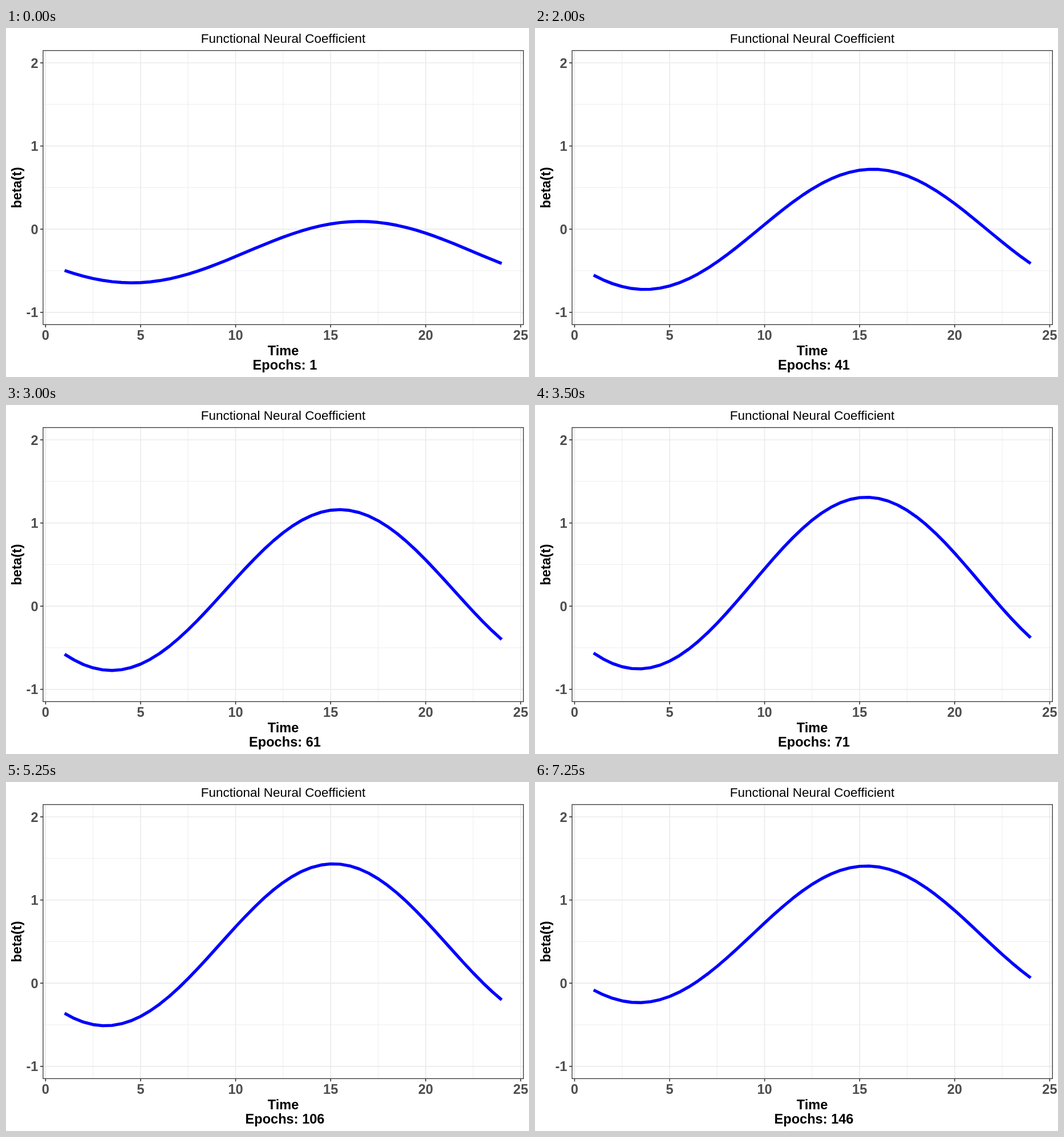
Write an HTML page that moves like this. It is 917 px wide and 611 px high and loops after 7.5 s.

```html
<!DOCTYPE html>
<html lang="en">
<head>
<meta charset="utf-8">
<title>Functional Neural Coefficient</title>
<style>
  html, body { margin: 0; width: 100%; height: 100%; overflow: hidden; background: #fff; }
  svg { display: block; width: 100%; height: 100%; }
  text { font: bold 23.6px "Liberation Sans", Arial, sans-serif; text-anchor: middle; }
  .title { font-weight: normal; font-size: 22.5px; }
  .tick { fill: #4d4d4d; }
  .end { text-anchor: end; }
  path, rect { fill: none; }
  .minor { stroke: #ebebeb; stroke-width: 0.9; }
  .major { stroke: #ebebeb; stroke-width: 1.7; }
  .axis { stroke: #333; stroke-width: 1.6; }
  .frame { stroke: #333; stroke-width: 1.3; }
  .curve { stroke: #00f; stroke-width: 5.4; stroke-linejoin: round; }
</style>
</head>
<body>
<svg id="chart" viewBox="0 0 917 611"></svg>
<script>
const LOOP = 7500, STEP = 250, EPOCHS_PER_STEP = 5, PERIOD = 24;
const LEFT = 65, RIGHT = 907.3, TOP = 39.5, BOTTOM = 519.3;
const MID_X = 486, MID_Y = 279.5;
const px = x => 69.4 + 33.32 * x;
const py = y => 352.2 - 145.6 * y;

// Fitted wave at chosen steps: [step, mean, amplitude, time of the peak]
const KEYS = [
  [0, -0.276, 0.369, 16.55],
  [4, -0.164, 0.511, 16.05],
  [8, -0.002, 0.723, 15.69],
  [12, 0.194, 0.967, 15.47],
  [17, 0.3805, 1.0605, 15.22],
  [21, 0.4615, 0.9735, 15.145],
  [29, 0.5875, 0.8215, 15.364]
];

const chart = document.getElementById('chart');

function add(tag, attrs, text = '') {
  const node = document.createElementNS(chart.namespaceURI, tag);
  for (const name in attrs) node.setAttribute(name, attrs[name]);
  node.textContent = text;
  return chart.appendChild(node);
}
const line = (cls, d) => add('path', { class: cls, d });
const label = (cls, x, y, text) => add('text', { class: cls, x, y }, text);
const vertical = (cls, x) => line(cls, `M${px(x)} ${TOP}V${BOTTOM}`);
const horizontal = (cls, y) => line(cls, `M${LEFT} ${py(y)}H${RIGHT}`);

for (let x = 2.5; x < 25; x += 5) vertical('minor', x);
for (let y = -0.5; y < 2; y++) horizontal('minor', y);
for (let x = 0; x <= 25; x += 5) {
  vertical('major', x);
  line('axis', `M${px(x)} ${BOTTOM}v5`);
  label('tick', px(x), 546, x);
}
for (let y = -1; y <= 2; y++) {
  horizontal('major', y);
  line('axis', `M${LEFT} ${py(y)}h-5`);
  label('tick end', 56.5, py(y) + 8.6, y);
}
const curve = line('curve', '');
add('rect', { class: 'frame', x: LEFT, y: TOP, width: RIGHT - LEFT, height: BOTTOM - TOP });
label('title', MID_X, 26, 'Functional Neural Coefficient');
label('', MID_X, 572.5, 'Time');
add('text', { transform: `translate(27 ${MID_Y}) rotate(-90)` }, 'beta(t)');
const counter = label('', 489, 598, '');

const secant = (i, c) => (KEYS[i + 1][c] - KEYS[i][c]) / (KEYS[i + 1][0] - KEYS[i][0]);

// Slope of column c at key i, weighted for uneven spacing
function slope(i, c) {
  const last = KEYS.length - 1;
  if (i === 0) return secant(0, c);
  if (i === last) return secant(last - 1, c);
  const before = KEYS[i][0] - KEYS[i - 1][0], after = KEYS[i + 1][0] - KEYS[i][0];
  return (secant(i - 1, c) * after + secant(i, c) * before) / (before + after);
}

function valueAt(step, c) {
  let i = 0;
  while (i < KEYS.length - 2 && step >= KEYS[i + 1][0]) i++;
  const [from, to] = [KEYS[i], KEYS[i + 1]];
  const span = to[0] - from[0], u = (step - from[0]) / span, v = 1 - u;
  return v * v * (1 + 2 * u) * from[c] + u * u * (1 + 2 * v) * to[c]
    + u * v * span * (v * slope(i, c) - u * slope(i + 1, c));
}

let shown = -1;
function draw() {
  const step = Math.floor(performance.now() % LOOP / STEP);
  if (step !== shown) {
    shown = step;
    const [mean, amplitude, peak] = [1, 2, 3].map(c => valueAt(step, c));
    const points = [];
    for (let x = 1; x <= 24; x += 0.5) {
      const y = mean + amplitude * Math.cos(2 * Math.PI * (x - peak) / PERIOD);
      points.push(px(x).toFixed(2) + ' ' + py(y).toFixed(2));
    }
    curve.setAttribute('d', 'M' + points.join('L'));
    counter.textContent = 'Epochs: ' + (1 + step * EPOCHS_PER_STEP);
  }
  requestAnimationFrame(draw);
}
draw();
</script>
</body>
</html>
```
